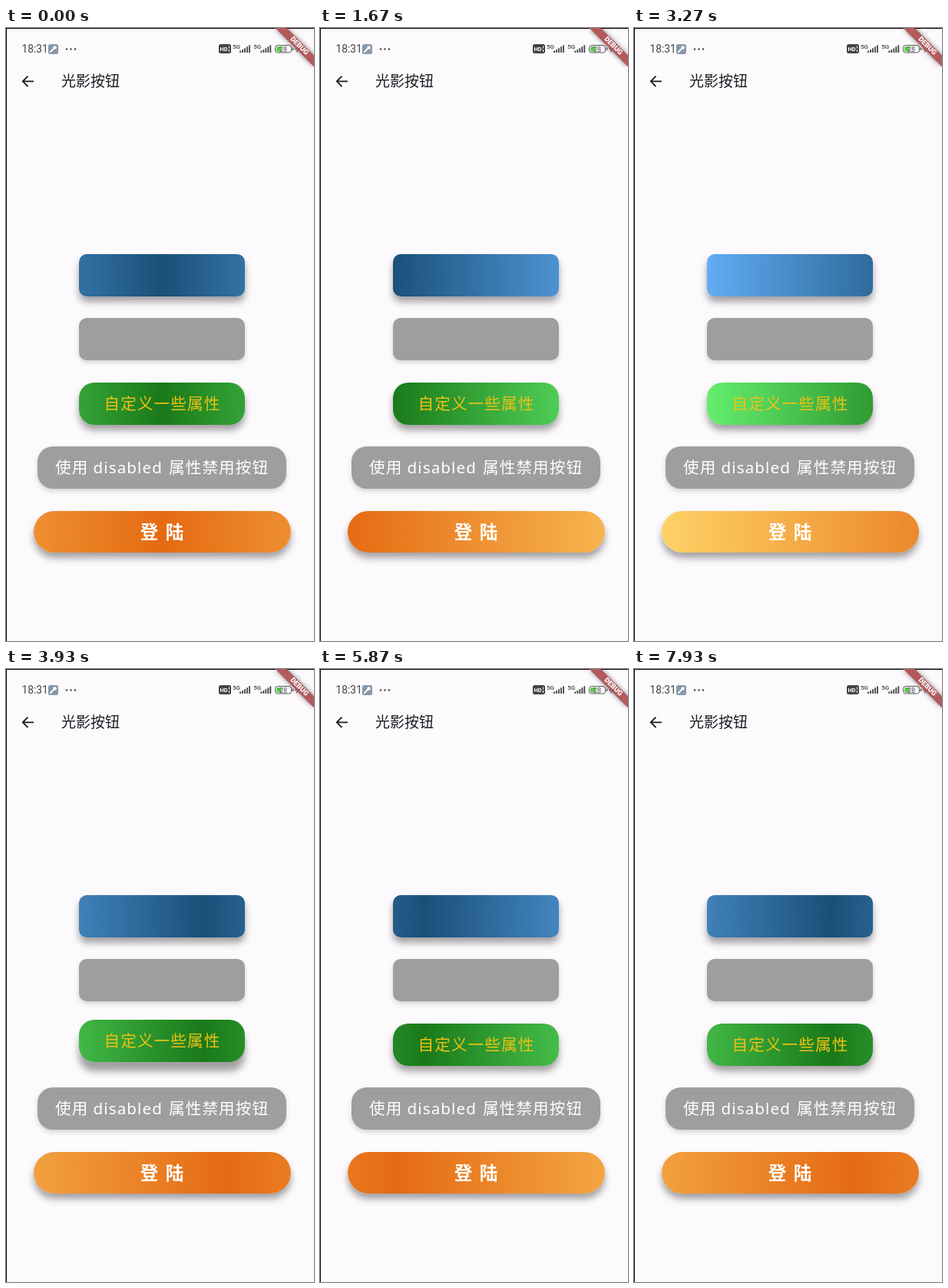
Recreate the animation shown at these times as an HTML page. Size 401 px wide and 797 px high, loop 8 s.

```html
<!DOCTYPE html>
<html lang="zh">
<head>
<meta charset="utf-8">
<style>
  html, body { margin: 0; width: 100%; height: 100%; overflow: hidden; background: #fdfafe; }
  #stage { position: absolute; left: 0; top: 0; width: 401px; height: 797px; overflow: hidden; }
  .button {
    position: absolute; box-sizing: border-box; height: 54.5px;
    background: #9f9da0; box-shadow: 0 3px 6px rgba(0, 0, 0, .16);
  }
  .lit { box-shadow: 0 calc(7px + var(--lift, 0px)) 10px rgba(0, 0, 0, .36); transform: translateY(calc(-1 * var(--lift, 0px))); }
  .narrow { left: 95px; width: 216px; border-radius: 10px; }
  svg { position: absolute; left: 0; top: 0; }
  text { font-family: "Noto Sans CJK SC", "Noto Sans CJK", "Noto Sans", sans-serif; }
  .label { font-size: 20.6px; font-weight: 500; letter-spacing: 1.1px; fill: #fff; }
  .status { font-family: Roboto, sans-serif; fill: #444; }
</style>
</head>
<body>
<div id="stage">
  <div class="button lit narrow" id="blue" style="top:294px"></div>
  <div class="button narrow" style="top:377px"></div>
  <div class="button lit narrow" id="green" style="top:461px;border-radius:20px"></div>
  <div class="button" style="left:41px;top:544px;width:324px;border-radius:20px"></div>
  <div class="button lit" id="orange" style="left:36px;top:627.5px;width:335px;border-radius:28px"></div>

  <svg width="401" height="797" viewBox="0 0 401 797">
    <path d="M0 0H401V1H1V797H0Z"/>

    <!-- status bar -->
    <text class="status" x="20.5" y="32" font-size="13.8">18:31</text>
    <rect x="55" y="21" width="13" height="13" rx="2.5" fill="#8798ab"/>
    <path d="M58 31L63 26" stroke="#fff" stroke-width="1.8" stroke-linecap="round"/>
    <circle cx="63.6" cy="25.4" r="2.2" fill="#fff"/>
    <g fill="#444">
      <circle cx="79" cy="27.5" r="1.2"/><circle cx="84.5" cy="27.5" r="1.2"/><circle cx="90" cy="27.5" r="1.2"/>
      <rect x="277" y="21" width="16" height="12" rx="2.5"/>
    </g>
    <text class="status" x="278.5" y="30" font-size="7.5" font-weight="700" style="fill:#fff">HD</text>
    <path d="M290.5 23.5V26.5M290.5 28V31" stroke="#fff"/>
    <g id="signal">
      <text class="status" x="295" y="26.5" font-size="8" font-weight="500">5G</text>
      <path d="M305 32V29.5M308 32V28M311 32V26.2M314 32V24.2M317 32V22.2" stroke="#444" stroke-width="1.8"/>
    </g>
    <use href="#signal" x="27.3"/>
    <rect x="350.5" y="22.5" width="21" height="9.5" rx="3" fill="#fff" stroke="#555"/>
    <rect x="352" y="24" width="6.5" height="6.5" rx="1.5" fill="#5cc84d"/>
    <text class="status" x="356" y="30.6" font-size="9">28</text>
    <path d="M373.5 25.5V29" stroke="#555" stroke-width="1.4"/>
    <path d="M380 22.5L376 28H379L378 32L382.5 26.5H379.5Z" fill="#333"/>

    <!-- app bar -->
    <path d="M36 69.3H22M28.5 62.6L21.8 69.3L28.5 76" fill="none" stroke="#1d1b20" stroke-width="1.8"/>
    <text x="72" y="75.9" font-size="19" fill="#1d1b20">光影按钮</text>

    <!-- button labels -->
    <text class="label" id="greenLabel" x="127.5" y="495.5" style="fill:#efc115">自定义一些属性</text>
    <g class="label">
      <text x="64" y="578.7">使用</text>
      <text x="113.5" y="578.7" style="font-family:'Noto Sans',sans-serif">disabled</text>
      <text x="212" y="578.7">属性禁用按钮</text>
    </g>
    <g font-size="23.5" font-weight="700" fill="#fff">
      <text x="174.8" y="663.5">登</text>
      <text x="207.8" y="663.5">陆</text>
    </g>

    <!-- corner ribbon -->
    <path d="M350.5 0H365.5L401 35.5V50.5Z" fill="#b25a5c" style="filter:drop-shadow(0 0 3px rgba(0,0,0,.5))"/>
    <text transform="translate(382.3 22.8) rotate(45)" y="1.2" text-anchor="middle" font-size="9.2"
      font-weight="900" fill="#fff" dy="2" style="font-family:Roboto,sans-serif">DEBUG</text>
  </svg>
</div>
<script>
const LOOP = 8000, STEP = 200 / 3, SWEEP = 2000, TURN = 1180;
const byId = id => document.getElementById(id);
const clamp = v => Math.max(0, Math.min(1, v));

// edge colour and core colour of each moving gradient
const lights = {
  blue: ['#66b2fb', '#1a5078'],
  green: ['#69f573', '#1a7919'],
  orange: ['#ffd86b', '#e56a13'],
};

// The core sweeps at constant speed between half a width left and right of the button.
function corePosition(t) {
  if (t < 265) return .5;
  const phase = (t - TURN + 2 * SWEEP) % (2 * SWEEP) / SWEEP;
  return -.5 + 2 * (phase < 1 ? phase : 2 - phase);
}

const liftAt = t => 5 * clamp((t - 3730) / 150) * clamp((4270 - t) / 150);

function draw(now) {
  const t = Math.floor((now % LOOP + 4) / STEP) * STEP;
  const core = corePosition(t) * 100;
  for (const [id, [edge, center]] of Object.entries(lights)) {
    byId(id).style.background =
      `linear-gradient(90deg, ${edge} ${core - 150}%, ${center} ${core}%, ${edge} ${core + 150}%)`;
  }
  const lift = liftAt(t);
  byId('green').style.setProperty('--lift', lift + 'px');
  byId('greenLabel').setAttribute('transform', `translate(0 ${-lift})`);
}

const start = performance.now();
function tick() {
  draw(performance.now() - start);
  requestAnimationFrame(tick);
}
tick();
</script>
</body>
</html>
```
